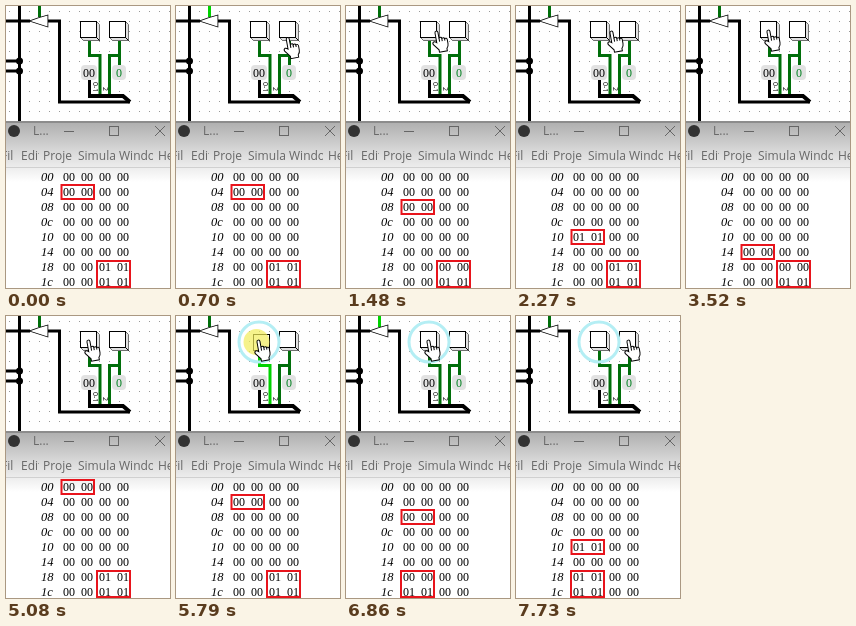
An HTML page with a canvas for the animation above (8000 ms loop, 164 by 282 pixels).

```html
<!DOCTYPE html>
<html lang="en">
<meta charset="utf-8">
<title>Memory loop</title>
<style>
html, body { margin: 0; width: 100%; height: 100%; overflow: hidden; background: #fff }
canvas { display: block; width: 164px; height: 282px }
</style>
<canvas width="164" height="282"></canvas>
<script>
const c = document.querySelector('canvas').getContext('2d');
const LOOP = 8000, STEP = 668, FIRST = 228;
const PRESS = 5230, RELEASE = 6240;
const DARK = '#006e0a', LIT = '#00d200', RED = '#e8141c', GREY = '#666';
const SERIF = '"Liberation Serif", serif', SANS = '"Open Sans", sans-serif';
const hand = new Path2D('M4.5 12V2.2Q4.5.6 6 .6T7.5 2.2V8Q10 6.8 10.3 8.7Q12.5 7.6 12.9 9.4Q15.4 8.7 15.4 11V15Q15.4 18 13.5 19.5V22H5.5V19.5L.8 13.5Q0 11.5 1.6 10.8Q3 10.5 4.5 12Z');

// Pointer moves: start, end, dx, dy
const moves = [[150, 940, -15, -29], [1010, 1180, -18, 0], [1480, 2190, 5, 0],
  [2350, 2500, -8, 0], [2810, 3130, -5, -1], [6860, 7650, 30, 0]];

const within = (t, a, b) => t >= a && t < b;

function ease(t, a, b) {
  const k = Math.min(1, Math.max(0, (t - a) / (b - a)));
  return k * k * (3 - 2 * k);
}

function rect(x, y, w, h, fill) {
  c.fillStyle = fill;
  c.fillRect(x, y, w, h);
}

function line(color, width, ...p) {
  c.strokeStyle = color;
  c.lineWidth = width;
  c.beginPath();
  for (let i = 0; i < p.length; i += 2) c.lineTo(p[i], p[i + 1]);
  c.stroke();
}

function frame(x, y, w, h, color, width) {
  c.strokeStyle = color;
  c.lineWidth = width;
  c.strokeRect(x, y, w, h);
}

function disc(x, y, r, fill) {
  c.fillStyle = fill;
  c.beginPath();
  c.arc(x, y, r, 0, 7);
  c.fill();
}

function text(s, x, y, font, fill = '#000') {
  c.font = font;
  c.fillStyle = fill;
  c.fillText(s, x, y);
}

function button(x, y, down) {
  const d = down ? 3 : 0;
  if (!down) {
    line('#000', 1, x + 16, y, x + 19, y + 3, x + 19, y + 19, x + 3, y + 19, x, y + 16);
    c.fillStyle = '#e0e0e0';
    c.fill();
    line('#000', 1, x + 16, y + 16, x + 19, y + 19);
  }
  rect(x + d, y + d, 16, 16, '#fff');
  frame(x + d, y + d, 16, 16, '#000', 1);
}

function probe(x, w, s, color) {
  c.fillStyle = '#e2e2e2';
  c.beginPath();
  c.roundRect(x, 59, w, 15, 4);
  c.fill();
  text(s, x + w / 2 - 3 * s.length, 71, '12px ' + SERIF, color);
}

function circuit(t) {
  const down = within(t, PRESS, RELEASE);
  const enabled = within(t, 470, 1100) || within(t, 6860, 7730);
  for (let x = 3; x < 164; x += 10)
    for (let y = 5; y < 116; y += 10) rect(x, y, 1, 1, '#999');

  line('#000', 3, 13.5, 0, 13.5, 116);
  line('#000', 3, 0, 15, 24, 15);
  for (const y of [55, 65]) {
    line('#000', 3, 0, y, 13, y);
    disc(13.5, y, 3.5, '#000');
  }
  line(enabled ? LIT : DARK, 3, 33.5, 0, 33.5, 11);
  line('#000', 3, 42, 15, 53.5, 15, 53.5, 96, 124, 96);
  line('#000', 1.6, 33, 12, 41.5, 9.5, 41.5, 20.5, 24.5, 15, 33, 12);
  c.fillStyle = '#fff';
  c.fill();

  line(down ? LIT : DARK, 3, 83.5, 34, 83.5, 49.5, 94, 49.5, 94, 88);
  line(DARK, 3, 113.5, 59, 113.5, 34, 113.5, 49.5, 103.5, 49.5, 103.5, 88);
  line('#000', 3, 83.5, 74, 83.5, 90);
  line('#000', 4, 82, 90, 117, 90, 124, 96);
  c.save();
  c.translate(87, 76);
  c.rotate(Math.PI / 2);
  text('0-1', 0, 0, '7px ' + SANS);
  text('2', 5, -10, '7px ' + SANS);
  c.restore();
  probe(75, 16, '00', '#000');
  probe(106, 14, '0', '#008020');
  button(74.5, 15.5, down);
  button(103.5, 15.5, false);
}

function chrome() {
  const shade = c.createLinearGradient(0, 117, 0, 176);
  shade.addColorStop(0, '#b0b0b0');
  shade.addColorStop(0.5, '#dadada');
  shade.addColorStop(1, '#fff');
  rect(0, 116, 164, 60, shade);
  rect(0, 115, 164, 2, '#8c8c8c');
  rect(0, 161, 164, 1, '#d0d0d0');
  disc(8, 125, 6, '#333');
  text('L...', 27, 129, '12px ' + SANS, GREY);
  line(GREY, 1, 58, 125.5, 68, 125.5);
  frame(103.5, 120.5, 9, 9, GREY, 1);
  line(GREY, 1, 149, 120, 159, 130);
  line(GREY, 1, 159, 120, 149, 130);
  const items = [['File', -5, 12], ['Edit', 15, 18], ['Project', 37, 29],
    ['Simulate', 72, 37], ['Window', 113, 34], ['Help', 152, 14]];
  for (const [s, x, w] of items) {
    c.save();
    c.beginPath();
    c.rect(x, 142, w, 18);
    c.clip();
    text(s, x, 154, '12px ' + SANS, GREY);
    c.restore();
  }
}

function memory(t) {
  const step = Math.max(0, Math.floor((t - FIRST) / STEP));
  const row = (1 + step) % 8;
  const phase = (t - FIRST + STEP) % STEP;
  const low = t >= RELEASE ? 0 : 2;
  const clearing = phase > STEP - 90;
  const pulse = (row == 2 || row == 4) && phase < 380;
  for (let r = 0; r < 8; r++) {
    const y = 175 + 15 * r;
    text((r * 4).toString(16).padStart(2, '0'), 35, y, 'italic 12.5px ' + SERIF);
    for (let i = 0; i < 4; i++) {
      const stored = (r == 7 || r == 6 && !clearing) && (i & 2) == low;
      text(stored || pulse && r == row && i < 2 ? '01' : '00', 57 + 18 * i, y, '12px ' + SERIF);
    }
  }
  frame(55.5, 164 + 15 * row, 32.5, 14, RED, 2);
  frame(55 + 18 * low, 255, 33, 26, RED, 2);
}

function pointer(t) {
  if (t >= PRESS) {
    c.globalAlpha = 0.7 * (1 - ease(t, RELEASE, 6640));
    disc(80.5, 26, 13, '#f2ec5a');
    c.globalAlpha = 1;
    c.strokeStyle = '#b4eef4';
    c.lineWidth = 3;
    c.beginPath();
    c.arc(83, 26, 20, 0, 7);
    c.stroke();
  }
  if (t < 150) return;
  let x = 119, y = 53;
  for (const [a, b, dx, dy] of moves) {
    x += dx * ease(t, a, b);
    y += dy * ease(t, a, b);
  }
  c.save();
  c.translate(x + 8, y + 11);
  c.rotate(-0.18);
  c.translate(-8, -11);
  c.fillStyle = '#fff';
  c.fill(hand);
  c.strokeStyle = '#000';
  c.lineWidth = 1;
  c.stroke(hand);
  for (let i = 0; i < 3; i++) line('#000', 1, 7.5 + 2.7 * i, 8.3 + i / 2, 7.5 + 2.7 * i, 11.5);
  c.restore();
}

function draw(now) {
  const t = now % LOOP;
  rect(0, 0, 164, 282, '#fff');
  circuit(t);
  chrome();
  memory(t);
  pointer(t);
  requestAnimationFrame(draw);
}
requestAnimationFrame(draw);
</script>
</html>
```
